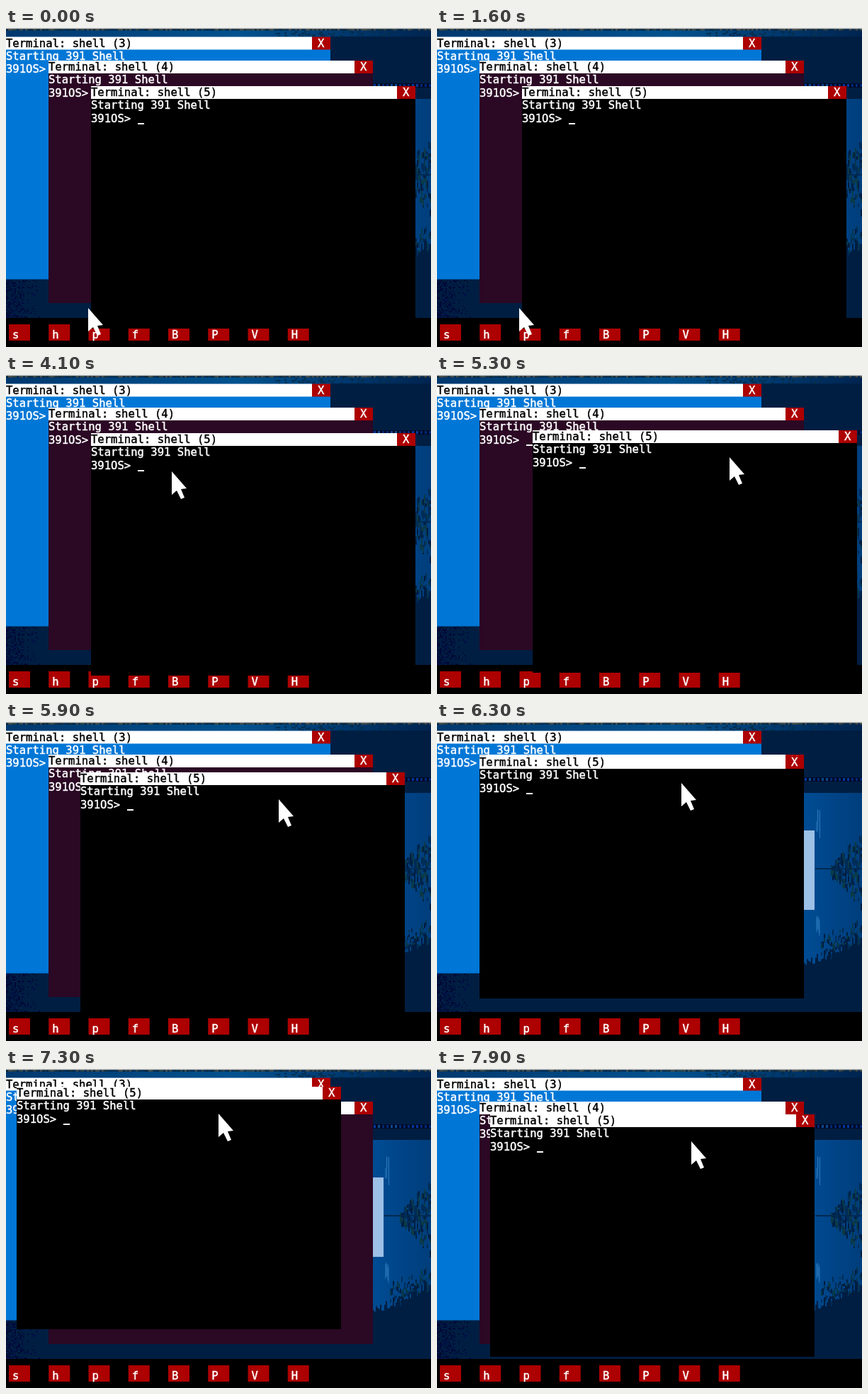
An HTML page with a canvas that plays this animation: 600 px wide and 450 px high, repeating every 8000 ms.

```html
<!DOCTYPE html>
<html lang="en">
<head>
<meta charset="utf-8">
<title>Shell windows</title>
<style>
  html, body { margin: 0; width: 100%; height: 100%; overflow: hidden; background: #000; }
  canvas { display: block; }
</style>
</head>
<body>
<canvas id="stage" width="600" height="450"></canvas>
<script>
const LOOP = 8000, STEP = 100;
const LINE = 18.3;
const WIN_W = 458, WIN_H = 342, BAR_H = 18, CLOSE_W = 26;
const RED = '#ad0000';

const ctx = document.getElementById('stage').getContext('2d');

function box(g, color, x, y, w, h) {
  g.fillStyle = color;
  g.fillRect(x, y, w, h);
}

let seed = 391;
function rand() {
  seed = (seed * 16807) % 2147483647;
  return seed / 2147483647;
}
const pick = list => list[Math.floor(rand() * list.length)];

// Slightly thickened monospaced text; y is the top of the line.
function text(str, x, y, color = '#fff') {
  ctx.font = '15.57px "DejaVu Sans Mono", monospace';
  ctx.fillStyle = ctx.strokeStyle = color;
  ctx.lineWidth = 0.45;
  ctx.lineJoin = 'miter';
  ctx.fillText(str, x, Math.round(y + 14));
  ctx.strokeText(str, x, Math.round(y + 14));
}

function makeWallpaper() {
  const c = document.createElement('canvas');
  c.width = 600;
  c.height = 450;
  const g = c.getContext('2d');
  const DARK = '#001e42';
  box(g, DARK, 0, 0, 600, 450);

  // Top edge
  const top = g.createLinearGradient(0, 0, 600, 0);
  top.addColorStop(0, '#00386e');
  top.addColorStop(0.55, '#00528f');
  top.addColorStop(0.8, '#00386e');
  top.addColorStop(1, '#002450');
  box(g, top, 0, 3, 600, 9);
  box(g, '#c4c6c6', 0, 0, 600, 1.5);
  for (let x = 0; x < 600; x += 3) {
    box(g, pick(['#0a2030', '#30403c', '#4a4a40', '#00284c', '#182c34']), x, 1.5, 3, 2);
  }
  for (let i = 0; i < 60; i++) {
    box(g, pick(['#06304a', '#002c50']), 380 + rand() * 160, 4 + rand() * 7, 3, 2);
  }

  // Glow on the right with a ragged lower edge
  const glow = g.createLinearGradient(500, 0, 600, 0);
  glow.addColorStop(0, '#00509a');
  glow.addColorStop(0.5, '#00468a');
  glow.addColorStop(1, '#003e7c');
  for (let x = 300; x < 600; x += 2) {
    const edge = 350 - Math.max(0, x - 518) * 0.5 - rand() * 14;
    box(g, glow, x, 100, 2, edge - 100);
    if (x > 540) {
      for (let k = 0; k < 3; k++) {
        box(g, pick([DARK, '#06384c', '#002c58']), x, edge - rand() * 26, 2, 3 + rand() * 5);
      }
    }
  }
  for (let x = 556; x < 600; x += 2) {
    const spread = 4 + (x - 556) * 1.15;
    for (let k = 0; k < 7; k++) {
      box(g, pick(['#002c58', '#0a3a48', DARK]), x, 205 + (rand() - 0.5) * 2 * spread, 2, 4 + rand() * 9);
    }
  }
  box(g, '#002a52', 534, 206, 66, 2);
  box(g, '#9cc0e6', 421, 153, 112, 112);
  for (let i = 0; i < 5; i++) {
    box(g, '#2a78ba', 535 + rand() * 5, 122 + rand() * 25, 1, 15 + rand() * 25);
    box(g, '#2a78ba', 535 + rand() * 5, 270 + rand() * 15, 1, 10 + rand() * 12);
  }

  // Dotted band
  box(g, '#000a26', 518, 78, 82, 6);
  for (let x = 519; x < 600; x += 6) {
    box(g, pick(['#0038a0', '#002878', '#0a4a90']), x, 79, 3, 4);
  }

  // Speckled lower left corner
  for (let i = 0; i < 330; i++) {
    const x = Math.floor(rand() * rand() * 26) * 2;
    box(g, pick(['#00083a', '#000a30', '#001048', '#00143c']), x, 355 + Math.floor(rand() * 27) * 2, 2, 2);
  }
  return c;
}

const wallpaper = makeWallpaper();

function drawTaskbar() {
  box(ctx, '#000', 0, 409, 600, 41);
  [...'shpfBPVH'].forEach((ch, i) => {
    const x = 4 + i * 56.25;
    box(ctx, RED, x, 418, 30, 23);
    text(ch, x + 5, 424);
  });
}

function drawWindow(id, x, y, color) {
  box(ctx, color, x, y, WIN_W, WIN_H);
  box(ctx, '#fff', x, y, WIN_W - CLOSE_W, BAR_H);
  box(ctx, RED, x + WIN_W - CLOSE_W, y, CLOSE_W, BAR_H);
  text(`Terminal: shell (${id})`, x, y, '#000');
  text('X', x + WIN_W - 18, y);
  text('Starting 391 Shell', x, y + LINE);
  text('391OS> ', x, y + 2 * LINE);
  box(ctx, '#fff', x + 66, y + 52, 9, 2);
}

const ARROW = [[0, 0], [0, 33], [7, 27], [13, 39], [18, 37], [13, 25], [21, 24]];
function drawPointer(x, y) {
  ctx.fillStyle = '#fff';
  ctx.beginPath();
  ARROW.forEach(([px, py]) => ctx.lineTo(x + px, y + py));
  ctx.closePath();
  ctx.fill();
}

// Pointer path: time, x, y
const PATH = [
  [0, 116, 395], [1800, 116, 395], [2500, 168, 325], [2700, 168, 325],
  [3600, 210, 205], [4100, 234, 136], [4900, 401, 120], [5300, 413, 116],
  [5900, 385, 109], [6800, 295, 57], [7200, 290, 56], [7900, 359, 102]
];
const DRAG_START = 4900, GRID = 15;

function pointerAt(t) {
  const i = PATH.findIndex(p => p[0] >= t);
  if (i < 1) return PATH[0].slice(1);
  const [t0, x0, y0] = PATH[i - 1], [t1, x1, y1] = PATH[i];
  const k = (t - t0) / (t1 - t0);
  return [Math.round(x0 + (x1 - x0) * k), Math.round(y0 + (y1 - y0) * k)];
}

// The dragged window snaps to a column grid and follows freely in height.
function windowAt(t, [mx, my]) {
  if (t < DRAG_START) return [120, 82];
  return [GRID * Math.floor((mx - 278) / GRID), my - 38];
}

function draw(t) {
  const mouse = pointerAt(t);
  ctx.drawImage(wallpaper, 0, 0);
  drawTaskbar();
  drawWindow(3, 0, 12.5, '#0077d6');
  drawWindow(4, 60, 46, '#2b0824');
  drawWindow(5, ...windowAt(t, mouse), '#000');
  drawPointer(...mouse);
}

function frame() {
  const t = performance.now() % LOOP;
  draw(Math.floor(t / STEP) * STEP);
  requestAnimationFrame(frame);
}
frame();
</script>
</body>
</html>
```
